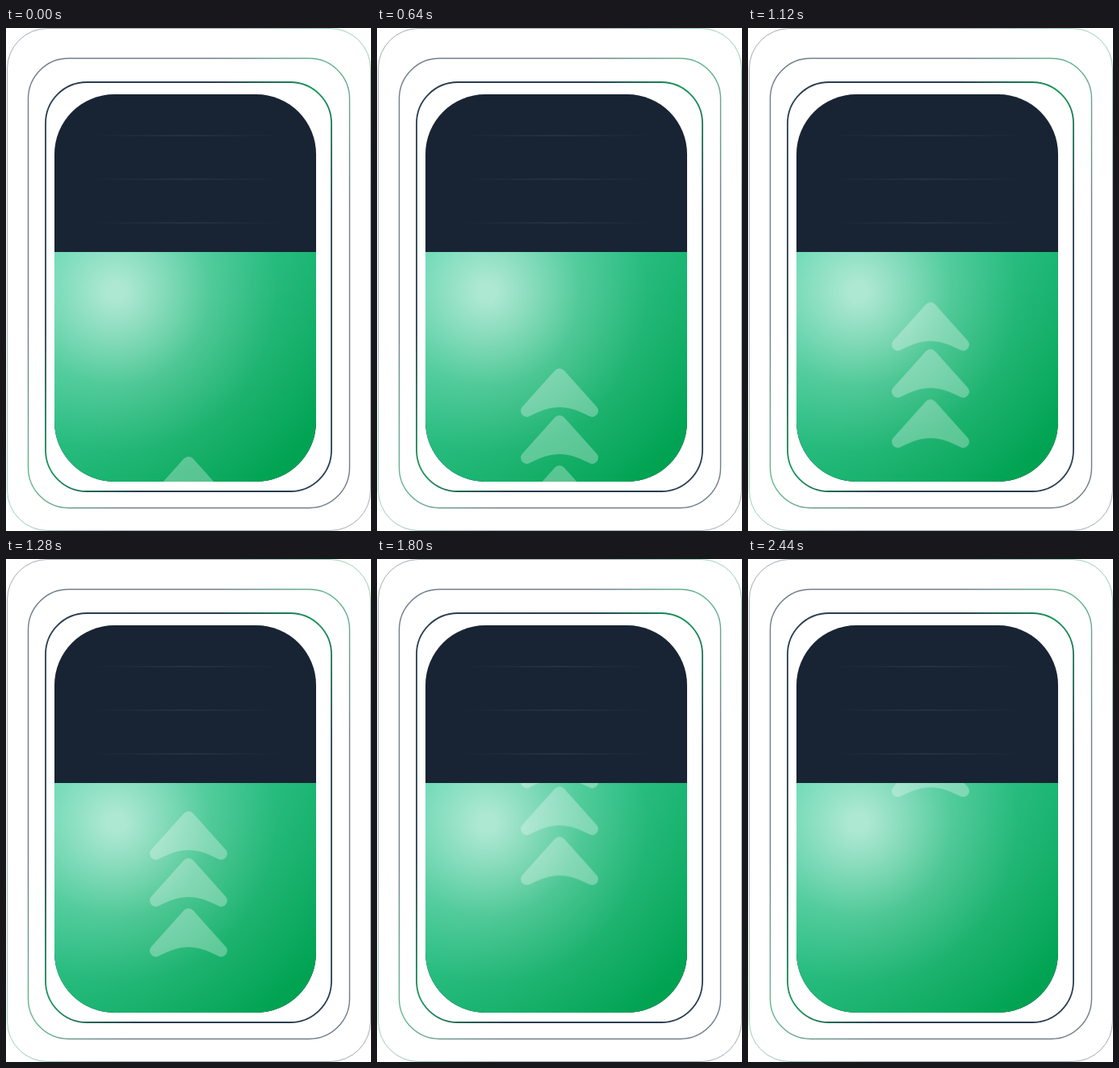
An HTML page for the animation above (2520 ms loop, 452 px wide and 622 px high).

```html
<!DOCTYPE html>
<html lang="en">
<head>
<meta charset="utf-8">
<title>Rising arrows</title>
<style>
  html, body { margin: 0; width: 100%; height: 100%; overflow: hidden; background: #fff; }
  svg { display: block; width: 452px; height: 622px; }
  .rings rect { fill: none; stroke: url(#edge); }
  .arrows { fill: #fff; fill-opacity: .3; animation: rise 2520ms steps(61) infinite; }
  /* 61 steps of 40 ms, then a short hold */
  @keyframes rise {
    0% { transform: translate(226px, 529.9px); }
    96.8254%, 100% { transform: translate(226px, 114.4px); }
  }
</style>
</head>
<body>
<svg viewBox="0 0 452 622">
  <defs>
    <linearGradient id="edge" x1="0" y1="0" x2="1" y2="1">
      <stop offset=".3" stop-color="#172d42"/>
      <stop offset=".48" stop-color="#04914a"/>
      <stop offset=".66" stop-color="#172d42"/>
    </linearGradient>
    <linearGradient id="green" x1="0" y1="0" x2="1" y2="1">
      <stop offset="0" stop-color="#2cc995"/>
      <stop offset=".93" stop-color="#00a251"/>
    </linearGradient>
    <radialGradient id="glow" gradientUnits="userSpaceOnUse" cx="137" cy="327" r="290">
      <stop offset=".04" stop-color="#fff" stop-opacity=".63"/>
      <stop offset=".4" stop-color="#fff" stop-opacity=".24"/>
      <stop offset=".68" stop-color="#fff" stop-opacity=".07"/>
      <stop offset="1" stop-color="#fff" stop-opacity="0"/>
    </radialGradient>
    <linearGradient id="line">
      <stop offset="0" stop-color="#fff" stop-opacity="0"/>
      <stop offset=".5" stop-color="#fff" stop-opacity=".06"/>
      <stop offset="1" stop-color="#fff" stop-opacity="0"/>
    </linearGradient>
    <clipPath id="body"><rect x="60" y="82" width="324" height="479" rx="74"/></clipPath>
    <clipPath id="fill"><rect x="60" y="277" width="324" height="284"/></clipPath>
    <path id="arrow" d="M-5.9 2.65A7.9 7.9 0 0 1 5.9 2.65L46.1 47.5A7.5 7.5 0 0 1 37 59.1C8 44.3 -8 44.3 -37 59.1A7.5 7.5 0 0 1 -46.1 47.5Z"/>
    <rect id="slat" x="100" width="244" height="2" fill="url(#line)"/>
  </defs>

  <g class="rings">
    <rect x="1.5" y=".5" width="450" height="621" rx="50" opacity=".4"/>
    <rect x="27.5" y="37.5" width="398" height="556" rx="50" stroke-width="1.4" opacity=".62"/>
    <rect x="49" y="67" width="354" height="506" rx="51" stroke-width="1.8" opacity=".92"/>
  </g>

  <g clip-path="url(#body)">
    <rect x="60" y="82" width="324" height="479" fill="#182433"/>
    <use href="#slat" y="132"/>
    <use href="#slat" y="186"/>
    <use href="#slat" y="240"/>
    <g clip-path="url(#fill)">
      <rect x="60" y="277" width="324" height="284" fill="url(#green)"/>
      <rect x="60" y="277" width="324" height="284" fill="url(#glow)"/>
      <g class="arrows">
        <use href="#arrow"/>
        <use href="#arrow" y="58"/>
        <use href="#arrow" y="120"/>
      </g>
    </g>
  </g>
</svg>
</body>
</html>
```
